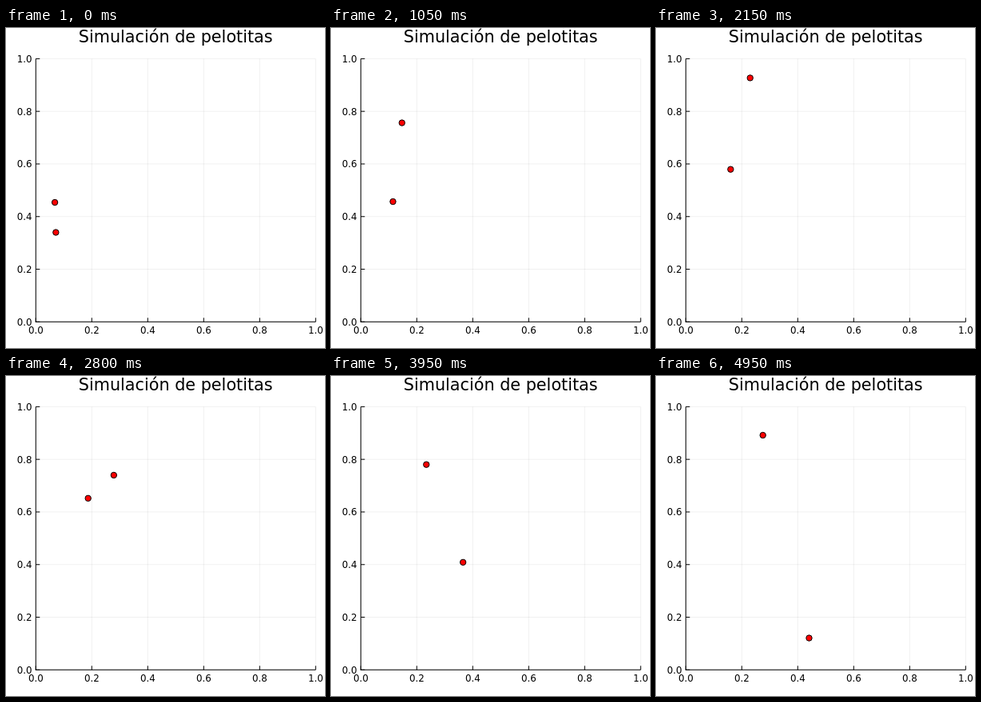
An HTML page with a canvas for the animation above (5000 ms loop, 399 by 400 pixels).

```html
<!DOCTYPE html>
<html lang="es">
<head>
<meta charset="utf-8">
<title>Simulación de pelotitas</title>
<style>
html, body { margin: 0; width: 100%; height: 100%; overflow: hidden; background: #fff; }
canvas { display: block; }
</style>
</head>
<body>
<canvas id="stage" width="399" height="400"></canvas>
<script>
const ctx = document.getElementById('stage').getContext('2d');
const FONT = '"DejaVu Sans", sans-serif';
const STEP = 50, STEPS = 100;
const plot = { left: 37.3, right: 387.3, top: 38.4, bottom: 367.3 };

// Start position and velocity in pixels per step.
const balls = [
  { x: 62.35, y: 255.5, vx: 0.7205, vy: -1.833 },
  { x: 61.1, y: 218, vx: 1.317, vy: -4.735 }
];

const toX = v => plot.left + v * (plot.right - plot.left);
const toY = v => plot.bottom - v * (plot.bottom - plot.top);

function line(x1, y1, x2, y2, color) {
  ctx.strokeStyle = color;
  ctx.lineWidth = 1;
  ctx.beginPath();
  ctx.moveTo(x1, y1);
  ctx.lineTo(x2, y2);
  ctx.stroke();
}

function label(text, x, y, size, align) {
  ctx.font = `${size}px ${FONT}`;
  ctx.textAlign = align;
  ctx.fillStyle = '#000';
  ctx.fillText(text, x, y);
}

function drawAxes() {
  const { left, right, top, bottom } = plot;
  const ticks = Array.from({ length: 6 }, (_, i) => i / 5);
  for (const v of ticks) {
    line(toX(v), top, toX(v), bottom, 'rgba(0,0,0,0.06)');
    line(left, toY(v), right, toY(v), 'rgba(0,0,0,0.06)');
  }
  line(left, top, left, bottom + 0.5, '#000');
  line(left - 0.5, bottom, right, bottom, '#000');
  for (const v of ticks) {
    line(toX(v), bottom, toX(v), bottom - 5, '#000');
    line(left, toY(v), left + 5, toY(v), '#000');
    label(v.toFixed(1), toX(v), 381.5, 11.85, 'center');
    label(v.toFixed(1), 32.5, toY(v) + 4.5, 11.85, 'right');
  }
  label('Simulación de pelotitas', 212.2, 18, 20.75, 'center');
}

function drawBall(ball, n) {
  const x = ball.x + ball.vx * n;
  const y = plot.top + Math.abs(ball.y + ball.vy * n - plot.top);
  ctx.beginPath();
  ctx.arc(x, y, 3.7, 0, 2 * Math.PI);
  ctx.fillStyle = '#f00';
  ctx.fill();
  ctx.strokeStyle = '#000';
  ctx.lineWidth = 1;
  ctx.stroke();
}

function render(now) {
  const n = Math.floor(now / STEP) % STEPS;
  ctx.fillStyle = '#fff';
  ctx.fillRect(0, 0, 399, 400);
  drawAxes();
  ctx.save();
  ctx.beginPath();
  ctx.rect(37, 38, 351, 330);
  ctx.clip();
  balls.forEach(ball => drawBall(ball, n));
  ctx.restore();
}

const start = performance.now();
function tick() {
  render(performance.now() - start);
  requestAnimationFrame(tick);
}
tick();
</script>
</body>
</html>
```
